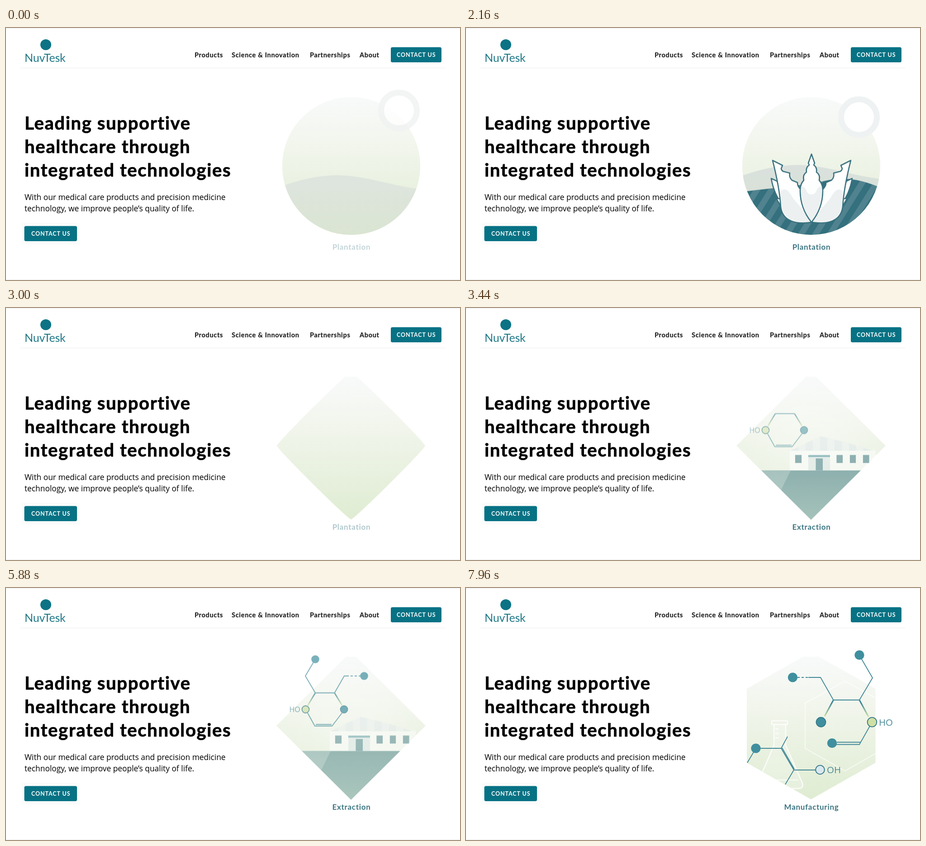
An HTML page for the animation above (8000 ms loop, 1004 by 558 pixels).

```html
<!DOCTYPE html>
<html lang="en">
<head>
<meta charset="utf-8">
<title>Supportive healthcare</title>
<style>
html, body { margin: 0; width: 100%; height: 100%; overflow: hidden; background: #fff; }
svg { display: block; width: 1004px; height: 558px; }
text { font-family: Lato, sans-serif; font-weight: 700; }
.h1 { font-size: 40px; letter-spacing: 1.65px; stroke: #000; stroke-width: .7; }
.nav { font-size: 14.5px; letter-spacing: .7px; fill: #1c1c1c; stroke: #1c1c1c; stroke-width: .2; }
.btn { font-size: 12.5px; letter-spacing: .9px; fill: #fff; }
.body { font: 400 17.35px "Open Sans", sans-serif; }
.brand { font-size: 25px; font-weight: 400; letter-spacing: -.2px; fill: #1d7886; }
.label { font-size: 17px; letter-spacing: .7px; fill: #3b7582; text-anchor: middle; }
.atom { font: 400 16px "Open Sans", sans-serif; fill: #4d8b99; }
.big { font-size: 20.5px; }

.ink { fill: none; stroke: #3f8797; stroke-width: 1.8; stroke-linejoin: round; }
.ball { fill: #3f8f9e; }
.rim { stroke: #34788a; stroke-width: 1.8; }
.leaf { fill: #fff; stroke: #39717e; stroke-width: 2.6; stroke-linejoin: round; }
.core { fill: #eef1f2; }
.win { fill: #2f6d7a; stroke: #dfe9eb; stroke-width: 1.5; paint-order: stroke; }

/* every track spans the whole 8 s loop: 1% = 80 ms */
#shape, .t { animation: 8s linear infinite; }
#shape { animation-name: morph; }
.t.l1 { animation-name: l1; }
.t.l2 { animation-name: l2; }
.t.l3 { animation-name: l3; }
.t.hill { animation-name: hill; }
.t.field { animation-name: field; }
.t.ring { animation-name: ring; }
.mid, .side, .back { transform-origin: 764px 430px; }
.t.mid { animation-name: mid; }
.t.side { animation-name: side; }
.t.back { animation-name: back; }
.t.sink { animation-name: sink; }
.t.site { animation-name: site; }
.t.tower { animation-name: tower; }
.t.mol { animation-name: mol; }
.t.draw1 { animation-name: draw1; }
.t.pop1 { animation-name: pop1; }
.t.drop { animation-name: drop; }
.t.rise { animation-name: rise; }
.t.cell { animation-name: cell; }
.t.flask { animation-name: flask; }
.t.draw2 { animation-name: draw2; }
.t.pop2 { animation-name: pop2; }
.draw1, .draw2 { stroke-dasharray: 1 2; }

@keyframes morph {
  0%, 34.25% {
    d: path("M763 153C847 153 916 221 916 305.5L916 305.5C916 390 847 458 763 458C679 458 611 390 611 305.5L611 305.5C611 221 679 153 763 153Z");
    animation-timing-function: cubic-bezier(.4, 0, .2, 1);
  }
  39.25%, 73.75% {
    d: path("M763 141C763 141 928 305 928 305L928 305C928 305 763 469 763 469C763 469 598 305 598 305L598 305C598 305 763 141 763 141Z");
    animation-timing-function: cubic-bezier(.4, 0, .2, 1);
  }
  78.75%, 100% {
    d: path("M763 142C763 142 905.5 223 905.5 223L905.5 387C905.5 387 763 468 763 468C763 468 621 387 621 387L621 223C621 223 763 142 763 142Z");
  }
}
@keyframes l1 { 0% { opacity: .3 } 4%, 35.2% { opacity: 1 } 37.5% { opacity: .4 } 39%, 100% { opacity: 0 } }
@keyframes l2 { 0%, 39% { opacity: 0 } 43%, 74.6% { opacity: 1 } 78.4%, 100% { opacity: 0 } }
@keyframes l3 { 0%, 78.4% { opacity: 0 } 82.2%, 100% { opacity: 1 } }

@keyframes hill {
  0% { transform: translateY(23px); opacity: .75; animation-timing-function: cubic-bezier(.2, .4, .3, 1) }
  10%, 100% { transform: none; opacity: 1 }
}
@keyframes field {
  0%, .8% { transform: translateY(46px); opacity: 0; animation-timing-function: cubic-bezier(.2, .4, .3, 1) }
  10.5%, 100% { transform: none; opacity: 1 }
}
@keyframes ring {
  0% { transform: translateY(-15px); opacity: .75; animation-timing-function: cubic-bezier(.2, .4, .3, 1) }
  12.5%, 25% { transform: none; opacity: 1; animation-timing-function: cubic-bezier(.32, 0, .67, 0) }
  36.1% { transform: translateY(-24px); opacity: .45 }
  37%, 100% { transform: translateY(-26px); opacity: 0 }
}
@keyframes mid {
  0%, 5% { transform: scale(.4, .1); opacity: 0; animation-timing-function: cubic-bezier(.2, .6, .3, 1) }
  16%, 100% { transform: none; opacity: 1 }
}
@keyframes side {
  0%, 7% { transform: scale(.4, .1); opacity: 0; animation-timing-function: cubic-bezier(.2, .6, .3, 1) }
  18%, 100% { transform: none; opacity: 1 }
}
@keyframes back {
  0%, 9% { transform: scale(.5, .3); opacity: 0; animation-timing-function: cubic-bezier(.2, .6, .3, 1) }
  20%, 100% { transform: none; opacity: 1 }
}
@keyframes sink {
  0%, 25% { transform: none; opacity: 1; animation-timing-function: cubic-bezier(.32, 0, .67, 0) }
  36.1%, 100% { transform: translateY(24px); opacity: 0 }
}

@keyframes site {
  0%, 41.25% { transform: translateY(24px); opacity: 0; animation-timing-function: cubic-bezier(.2, .5, .3, 1) }
  50%, 64.4% { transform: none; opacity: 1; animation-timing-function: cubic-bezier(.32, 0, .67, 0) }
  75.5%, 100% { transform: translateY(24px); opacity: 0 }
}
@keyframes tower {
  0%, 44% { transform: translateY(60px); opacity: 0; animation-timing-function: cubic-bezier(.2, .5, .3, 1) }
  52.5%, 61% { transform: none; opacity: 1; animation-timing-function: cubic-bezier(.4, 0, .8, .6) }
  72.8%, 100% { transform: translateY(56px); opacity: 0 }
}
@keyframes mol {
  0%, 40.5% { transform: translateY(-24px); opacity: 0; animation-timing-function: cubic-bezier(.2, .5, .3, 1) }
  52.5%, 64.4% { transform: none; opacity: 1; animation-timing-function: cubic-bezier(.32, 0, .67, 0) }
  75.5% { transform: translateY(-24px); opacity: .45 }
  76.5%, 100% { transform: translateY(-26px); opacity: 0 }
}
@keyframes draw1 { 0%, 44% { stroke-dashoffset: 1 } 51%, 100% { stroke-dashoffset: 0 } }
@keyframes pop1 { 0%, 48% { opacity: 0 } 52%, 100% { opacity: 1 } }

@keyframes drop {
  0%, 78.75% { transform: translateY(-34px); opacity: 0 }
  82% { transform: translateY(-20.5px); opacity: 1 }
  82.5% { transform: translateY(-19px); opacity: 1; animation-timing-function: cubic-bezier(.2, .5, .3, 1) }
  96%, 100% { transform: none; opacity: 1 }
}
@keyframes rise {
  0%, 78.75% { transform: translateY(14px); opacity: 0 }
  82.5% { transform: translateY(2px); opacity: 1; animation-timing-function: ease-out }
  88%, 100% { transform: none; opacity: 1 }
}
@keyframes cell {
  0%, 78.75% { transform: translateY(-24px); opacity: 0 }
  82.5% { transform: translateY(-14px); opacity: 1; animation-timing-function: cubic-bezier(.2, .5, .3, 1) }
  96%, 100% { transform: none; opacity: 1 }
}
@keyframes flask {
  0%, 84% { transform: translateY(14px); opacity: 0; animation-timing-function: ease-out }
  95%, 100% { transform: none; opacity: 1 }
}
@keyframes draw2 { 0%, 83% { stroke-dashoffset: 1 } 92.5%, 100% { stroke-dashoffset: 0 } }
@keyframes pop2 { 0%, 89% { opacity: 0 } 93.5%, 100% { opacity: 1 } }
</style>
</head>
<body>
<svg viewBox="0 0 1004 558">
  <defs>
    <linearGradient id="sky" gradientUnits="userSpaceOnUse" x1="0" y1="152" x2="0" y2="468">
      <stop offset="0" stop-color="#fff"/><stop offset="0" stop-color="#f8fafa"/>
      <stop offset=".3" stop-color="#f3f6ee"/><stop offset="1" stop-color="#dfecd2"/>
    </linearGradient>
    <linearGradient id="mist" x1="0" y1="0" x2="0" y2="1">
      <stop offset="0" stop-color="#dae1de"/><stop offset="1" stop-color="#d8e2cd"/>
    </linearGradient>
    <linearGradient id="soil" x1="0" y1="0" x2="0" y2="1">
      <stop offset="0" stop-color="#33707d"/><stop offset="1" stop-color="#719ea8"/>
    </linearGradient>
    <radialGradient id="haze" gradientUnits="userSpaceOnUse" cx="755" cy="290" r="170">
      <stop offset=".3" stop-color="#fff" stop-opacity=".6"/><stop offset="1" stop-color="#fff" stop-opacity=".1"/>
    </radialGradient>
    <linearGradient id="tint1" gradientUnits="userSpaceOnUse" x1="0" y1="246" x2="0" y2="273">
      <stop offset=".2" stop-color="#3f8797"/><stop offset="1" stop-color="#cfe0a0"/>
    </linearGradient>
    <linearGradient id="tint2" gradientUnits="userSpaceOnUse" x1="0" y1="248" x2="0" y2="285">
      <stop offset=".2" stop-color="#3f8797"/><stop offset="1" stop-color="#cfe0a0"/>
    </linearGradient>
    <pattern id="rows" width="27" height="27" patternUnits="userSpaceOnUse" patternTransform="rotate(32)">
      <path d="M0 0H27V27H0Z" fill="#336f7d"/><path d="M0 0H13V27H0Z" fill="#4f838f"/>
    </pattern>
    <pattern id="slats" x="719" width="32" height="40" patternUnits="userSpaceOnUse">
      <path d="M0 0H32V40H0Z" fill="#eaf0f2"/><path d="M0 0H16V40H0Z" fill="#dde7ea"/>
    </pattern>
    <clipPath id="disc"><circle cx="763.5" cy="305.5" r="152.5"/></clipPath>
    <clipPath id="gem"><path d="M763 141L928 305L763 469L598 305Z"/></clipPath>
    <clipPath id="hex"><path d="M763 142L905.5 223V387L763 468L621 387V223Z"/></clipPath>
    <g id="blade">
      <path class="leaf" d="M764 430C730 435 700 428 696 396C694 362 688 332 678 293L700 304L697 311Q698 317 704 318L716 321Q714 331 721 337L733 342Q732 350 741 358L764 430Z"/>
      <path class="core" d="M760 428C732 432 701 424 698 394L695 362C706 350 715 362 724 378C734 390 748 404 760 428Z"/>
    </g>
    <g id="spikes" class="leaf">
      <path d="M675 333L688 339L690 346L702 352V396C687 374 679 357 675 333Z"/>
      <path d="M686 377L702 379V404Z"/>
    </g>
  </defs>

  <path d="M0 .5H1004M0 557.5H1004" stroke="#ebebeb"/>
  <path d="M32 88.5H971" stroke="#eee"/>
  <circle cx="88" cy="37" r="12" fill="#0b7384"/>
  <text class="brand" x="41" y="75">NuvTesk</text>
  <g class="nav">
    <text x="417" y="64.5">Products</text>
    <text x="499" y="64.5">Science &amp; Innovation</text>
    <text x="672" y="64.5">Partnerships</text>
    <text x="782" y="64.5">About</text>
  </g>
  <path d="M35 431H163V480H35Z" fill="#fbfcfc"/>
  <g fill="#077284">
    <rect x="851" y="42.5" width="112" height="33.5" rx="3.5"/>
    <rect x="40.5" y="438.500" width="116.500" height="33.5" rx="3.5"/>
  </g>
  <text class="btn" x="864" y="63.5">CONTACT US</text>
  <text class="btn" x="56" y="459.5">CONTACT US</text>
  <g class="h1">
    <text x="41" y="224.5">Leading supportive</text>
    <text x="41" y="276.5">healthcare through</text>
    <text x="41" y="328.5">integrated technologies</text>
  </g>
  <text class="body" x="41" y="381">With our medical care products and precision medicine</text>
  <text class="body" x="41" y="406">technology, we improve people’s quality of life.</text>

  <path id="shape" fill="url(#sky)"/>

  <!-- plantation -->
  <g clip-path="url(#disc)"><g class="t sink">
    <path class="t hill" fill="url(#mist)" d="M600 331C650 312 692 303 735 303C800 304 850 327 925 335V480H600Z"/>
    <path class="t field" fill="url(#rows)" d="M600 364C680 353 745 350 800 337C840 329 875 335 925 357V480H600Z"/>
  </g></g>
  <g class="t sink">
    <g class="t back"><use href="#spikes"/><use href="#spikes" transform="matrix(-1 0 0 1 1529 0)"/></g>
    <g class="t side"><use href="#blade"/><use href="#blade" transform="matrix(-1 0 0 1 1529 0)"/></g>
    <g class="t mid">
      <path class="leaf" d="M764 279L757 299L759 303Q751 309 753 319Q744 325 747 337Q739 345 739 360C739 386 748 410 764 430C780 410 789 386 789 360Q789 345 781 337Q784 325 775 319Q777 309 769 303L771 299Z"/>
      <path class="core" d="M741 350C746 350 750 354 752 358C755 372 773 372 776 358C778 354 782 350 787 350C789 386 779 408 764 427C749 408 739 386 741 350Z"/>
    </g>
  </g>
  <circle class="t ring" cx="869" cy="197.5" r="39.5" fill="#fff" stroke="#eff2f2" stroke-width="13"/>

  <!-- extraction -->
  <g clip-path="url(#gem)"><g class="t site">
    <path d="M590 130H940V348H590Z" fill="url(#haze)"/>
    <path d="M598 347.5H928V469H598Z" fill="url(#soil)"/>
    <path d="M598 347.5H718L658 470H598Z" fill="#fff" fill-opacity=".25"/>
  </g></g>
  <g class="t tower">
    <path d="M847 300V220C847 198 880 198 880 220V300Z" fill="#dbe4e7"/>
    <path class="ink" d="M838 298V214.500H889V298M838 239.500H889M838 264.500H889M838 289.500H889M838 214.500L889 239.500L838 264.500L889 289.500M889 214.500L838 239.500L889 264.500L838 289.500"/>
  </g>
  <g class="t mol">
    <path class="ink" d="M684 245.500H726.500M667 290L683 319H721L743 290M685 315.500H720"/>
    <path class="ink t draw1" pathLength="1" d="M684 245.500L662 208L684 171"/>
    <path class="ink t draw1" pathLength="1" d="M726.500 245.500L748 208H753"/>
    <path class="ink t pop1" stroke-dasharray="5 4" d="M753 208H784"/>
    <path d="M684 245.500L667 274M726.500 245.500L743 273" stroke="url(#tint1)" stroke-width="2.600"/>
    <g class="ball t pop1"><circle cx="684" cy="171" r="8.800"/><circle cx="792" cy="208" r="8.800"/></g>
    <circle class="rim" cx="662.500" cy="282" r="8" fill="#cfe0a4"/>
    <circle class="ball rim" cx="747.500" cy="282" r="8"/>
    <text class="atom" x="626.500" y="288">HO</text>
  </g>
  <g class="t site">
    <path d="M716 303H906V347.500H716Z" fill="#fff"/>
    <path d="M717 304L784 272L842 286L899 304Z" fill="url(#slats)"/>
    <path d="M757 314H805V347.500H757Z" fill="#d8e4e7"/>
    <path d="M757 313.500H805V318H757Z" fill="#3f8b99"/>
    <path d="M773.500 321H789V347.500H773.500Z" fill="#2f6d7a"/>
    <path class="win" d="M728 313.500H742V331H728ZM819.500 313.500H833V331H819.500ZM849 313.500H862V331H849ZM878 313.500H891.500V331H878Z"/>
  </g>

  <!-- manufacturing -->
  <g clip-path="url(#hex)" fill="none" stroke="#fff" stroke-width="2">
    <path class="t cell" stroke-opacity=".75" stroke-width="1.600" d="M838 206L926 255V355L838 405L750 355V255Z"/>
    <g class="t flask" stroke-opacity=".8" stroke-width="2.500">
      <path fill="#fff" fill-opacity=".2" d="M681 302V348L645 432Q642 444 653 444H735Q747 444 744 432L707 348V302"/>
      <rect x="676" y="294" width="35" height="8" rx="2"/>
      <path d="M684 312H692M684 322H692M684 332H692M655 425H735" stroke-width="1.800"/>
    </g>
  </g>
  <g class="t drop">
    <path class="ink" d="M812.500 248H870M898 297L870 346.500H814M820 341.500H872"/>
    <path class="ink t draw2" pathLength="1" d="M812.500 248L784 198H757"/>
    <path class="ink t draw2" pathLength="1" d="M870 248L899 199L870 149"/>
    <path class="ink t pop2" stroke-dasharray="5 4" d="M733 198H757"/>
    <path d="M812.500 248L793 284M870 248L890 285" stroke="url(#tint2)" stroke-width="3"/>
    <g class="ball t pop2"><circle cx="722.500" cy="198" r="10.600"/><circle cx="870" cy="148.500" r="10.600"/></g>
    <circle class="ball" cx="809.500" cy="343.500" r="10.600"/>
    <circle class="ball rim" cx="785" cy="297" r="10.500"/>
    <circle class="rim" cx="898" cy="297" r="10.300" fill="#cfe0a4"/>
    <text class="atom big" x="913" y="304.500">HO</text>
  </g>
  <g class="t rise">
    <path class="ink" d="M622 387L641 355H697L711 329M697 355L725 403H773M699 354L726 401M725 403L706 435"/>
    <circle class="ball" cx="641" cy="355" r="10.600"/>
    <circle class="rim" cx="783" cy="402.500" r="9.800" fill="#d9e8ee"/>
    <text class="atom big" x="798" y="410">OH</text>
  </g>

  <text class="label t l1" x="764" y="491">Plantation</text>
  <text class="label t l2" x="764" y="491">Extraction</text>
  <text class="label t l3" x="764" y="491">Manufacturing</text>
</svg>
</body>
</html>
```
